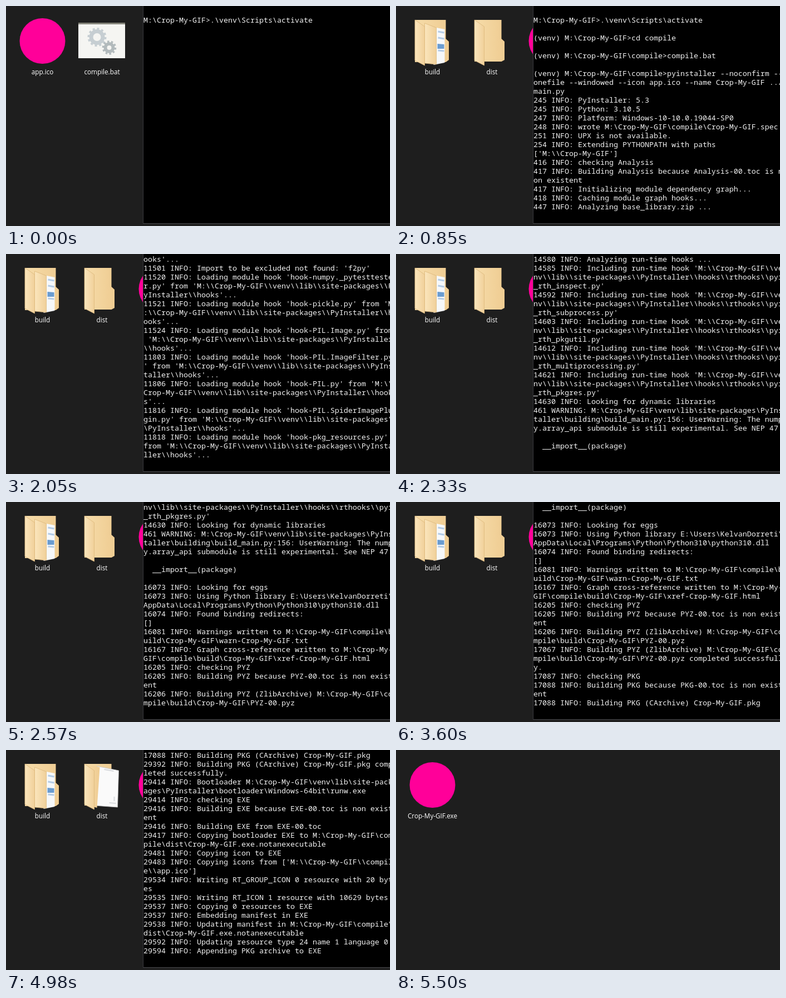
Recreate the animation shown at these times as an HTML page. Size 690 by 396 pixels, loop 5.64 s.

```html
<!DOCTYPE html>
<html lang="en">
<head>
<meta charset="utf-8">
<title>Compile</title>
<style>
html, body { margin: 0; width: 100%; height: 100%; overflow: hidden; background: #1e1e1e; }
#stage { position: relative; width: 690px; height: 396px; overflow: hidden; }
svg { position: absolute; left: 0; top: 0; }
svg text { font: 11.7px "Open Sans", "Noto Sans", sans-serif; fill: #fff; text-anchor: middle; }
#terminal {
  position: absolute; left: 246px; top: 0; width: 444px; height: 391px;
  background: #000; border-left: 1px solid #38383c; border-bottom: 1px solid #48484c;
  overflow: hidden;
}
#screen {
  position: absolute; left: 0; top: 1px; margin: 0; color: #f2f2f2;
  font: 500 13.3333px/16px "Noto Sans Mono", "DejaVu Sans Mono", monospace;
  font-variant-ligatures: none; white-space: pre;
}
#cursor { position: absolute; width: 8px; height: 3px; background: #f2f2f2; }
</style>
</head>
<body>
<div id="stage">
  <svg width="690" height="396" viewBox="0 0 690 396">
    <defs>
      <linearGradient id="tan" x2="1">
        <stop offset="0" stop-color="#f6dca9"/><stop offset="1" stop-color="#efcc92"/>
      </linearGradient>
      <linearGradient id="flap" x2="1">
        <stop offset="0" stop-color="#fbe6bd"/><stop offset="1" stop-color="#f0d09a"/>
      </linearGradient>
      <!-- icons are drawn around x = 0, the centre of a slot -->
      <circle id="app" cy="63" r="41" fill="#ff0099"/>
      <g id="bat">
        <path d="M-42.500 30H41.500V94H-42.500Z" fill="#f5f5f2"/>
        <path d="M-42.500 30H41.500V33H-42.500Z" fill="#85857a"/>
        <g fill="none" stroke="#c6ced2">
          <circle cx="-9" cy="56" r="10.500" stroke-width="7"/>
          <circle cx="-9" cy="56" r="15" stroke-width="4" pathLength="24" stroke-dasharray="1"/>
        </g>
        <g fill="none" stroke="#b2babc">
          <circle cx="13" cy="75" r="7" stroke-width="6"/>
          <circle cx="13" cy="75" r="11" stroke-width="3.500" pathLength="20" stroke-dasharray="1"/>
        </g>
      </g>
      <path id="back" d="M-31.500 25H17V59L22.500 64V97L17 100H-31.500Z" fill="url(#tan)"/>
      <path id="front" d="M-31.500 25L-14 37V107L-31.500 98Z" fill="url(#flap)" stroke="#dcb87c" stroke-width=".8"/>
      <g id="build">
        <path d="M-31.500 25H24V59L29.500 64V97L24 101H-31.500Z" fill="url(#tan)"/>
        <path d="M2 38L22 42V102L2 106Z" fill="#f6f8fa"/>
        <path d="M10 46L21 48M10 57L21 59M10 80L21 81" stroke="#b4cce6" stroke-width="3"/>
        <path d="M9 68L21 69V77L9 77Z" fill="#6a9cd0"/>
        <path d="M-14 31L7 39V105L-14 103Z" fill="url(#flap)" stroke="#dcb87c" stroke-width=".8"/>
        <use href="#front"/>
      </g>
      <g id="full">
        <use href="#back"/>
        <path d="M-9 29L30 37L28 103L-13 100Z" fill="#fafafa" stroke="#c0c0c0" stroke-width=".8"/>
        <path d="M4 35L21 38M13 95L25 96M22 84V92" stroke="#d8dade" stroke-width="2"/>
        <path d="M-31.500 25L-4 31L-9 104L-31.500 98Z" fill="url(#tan)"/>
        <use href="#front"/>
      </g>
      <g id="empty"><use href="#back"/><use href="#front"/></g>
    </defs>
    <rect width="690" height="396" fill="#1e1e1e"/>
    <g id="icons"></g>
  </svg>
  <div id="terminal"><pre id="screen"></pre><div id="cursor"></div></div>
</div>
<script>
const LOOP = 5640, COLS = 56, ROWS = 24;
const SPEED = 9.6, LOG_START = 800;   // the log runs 9.6 times faster than its own clock
const site = String.raw`M:\\Crop-My-GIF\\venv\\lib\\site-packages\\PyInstaller`;
const venvPrompt = String.raw`(venv) M:\Crop-My-GIF\compile>`;

const log = String.raw`245 PyInstaller: 5.3
245 Python: 3.10.5
247 Platform: Windows-10-10.0.19044-SP0
248 wrote M:\Crop-My-GIF\compile\Crop-My-GIF.spec
251 UPX is not available.
254 Extending PYTHONPATH with paths
['M:\\Crop-My-GIF']
416 checking Analysis
417 Building Analysis because Analysis-00.toc is non existent
417 Initializing module dependency graph...
418 Caching module graph hooks...
447 Analyzing base_library.zip ...
3673 Processing pre-find module path hook distutils from '${site}\\hooks\\pre_find_module_path\\hook-distutils.py'.
3674 distutils: retargeting to non-venv dir 'E:\\Users\\KelvanDorreti\\AppData\\Local\\Programs\\Python\\Python310\\lib'
4598 Caching module dependency graph...
4761 running Analysis Analysis-00.toc
4763 Adding Microsoft.Windows.Common-Controls to dependent assemblies of final executable
  required by E:\Users\KelvanDorreti\AppData\Local\Programs\Python\Python310\python.exe
4844 Analyzing M:\Crop-My-GIF\main.py
5832 Processing pre-find module path hook site from '${site}\\hooks\\pre_find_module_path\\hook-site.py'.
5834 site: retargeting to fake-dir '${site}\\fake-modules'
6420 Processing module hooks...
6421 hook distutils
6760 hook distutils.util
7240 hook encodings
7810 hook heapq
8330 hook lib2to3
8850 hook multiprocessing.util
9410 hook numpy
10260 hook platform
10840 hook difflib
11490 hook pytest
11501 Import to be excluded not found: 'f2py'
11520 hook numpy._pytesttester
11521 hook pickle
11524 hook PIL.Image
11803 hook PIL.ImageFilter
11806 hook PIL
11816 hook PIL.SpiderImagePlugin
11818 hook pkg_resources
12680 hook setuptools
13210 hook sysconfig
13740 hook xml.etree.cElementTree
14210 Looking for ctypes DLLs
14580 Analyzing run-time hooks ...
14585 rthook inspect
14592 rthook subprocess
14603 rthook pkgutil
14612 rthook multiprocessing
14621 rthook pkgres
14630 Looking for dynamic libraries
461 WARNING: M:\Crop-My-GIF\venv\lib\site-packages\PyInstaller\building\build_main.py:156: UserWarning: The numpy.array_api submodule is still experimental. See NEP 47.
  __import__(package)

16073 Looking for eggs
16073 Using Python library E:\Users\KelvanDorreti\AppData\Local\Programs\Python\Python310\python310.dll
16074 Found binding redirects:
[]
16081 Warnings written to M:\Crop-My-GIF\compile\build\Crop-My-GIF\warn-Crop-My-GIF.txt
16167 Graph cross-reference written to M:\Crop-My-GIF\compile\build\Crop-My-GIF\xref-Crop-My-GIF.html
16205 checking PYZ
16205 Building PYZ because PYZ-00.toc is non existent
16206 Building PYZ (ZlibArchive) M:\Crop-My-GIF\compile\build\Crop-My-GIF\PYZ-00.pyz
17067 Building PYZ (ZlibArchive) M:\Crop-My-GIF\compile\build\Crop-My-GIF\PYZ-00.pyz completed successfully.
17087 checking PKG
17088 Building PKG because PKG-00.toc is non existent
17088 Building PKG (CArchive) Crop-My-GIF.pkg
29392 Building PKG (CArchive) Crop-My-GIF.pkg completed successfully.
29414 Bootloader M:\Crop-My-GIF\venv\lib\site-packages\PyInstaller\bootloader\Windows-64bit\runw.exe
29414 checking EXE
29416 Building EXE because EXE-00.toc is non existent
29416 Building EXE from EXE-00.toc
29417 Copying bootloader EXE to M:\Crop-My-GIF\compile\dist\Crop-My-GIF.exe.notanexecutable
29481 Copying icon to EXE
29483 Copying icons from ['M:\\Crop-My-GIF\\compile\\app.ico']
29534 Writing RT_GROUP_ICON 0 resource with 20 bytes
29535 Writing RT_ICON 1 resource with 10629 bytes
29537 Copying 0 resources to EXE
29537 Embedding manifest in EXE
29538 Updating manifest in M:\Crop-My-GIF\compile\dist\Crop-My-GIF.exe.notanexecutable
29592 Updating resource type 24 name 1 language 0
29594 Appending PKG archive to EXE
40800 Building EXE from EXE-00.toc completed successfully.`;

const expand = line => line
  .replace(/^(\d+) hook (\S+)$/, (_, n, name) => `${n} Loading module hook 'hook-${name}.py' from '${site}\\\\hooks'...`)
  .replace(/^(\d+) rthook (\S+)$/, (_, n, name) => `${n} Including run-time hook '${site}\\\\hooks\\\\rthooks\\\\pyi_rth_${name}.py'`)
  .replace(/^(\d+) (?!WARNING)/, "$1 INFO: ");

let clock = 0;
const logOutput = log.split("\n").map(line => {
  clock = Math.max(clock, parseInt(line) || 0);
  return { at: LOG_START + clock / SPEED, text: expand(line) + "\n" };
});

const output = [
  { at: 0, text: "\nM:\\Crop-My-GIF>.\\venv\\Scripts\\activate" },
  { at: 60, text: "\n\n(venv) M:\\Crop-My-GIF>", typed: "cd compile" },
  { at: 330, text: "\n\n" + venvPrompt, typed: "compile.bat" },
  { at: 620, text: `\n\n${venvPrompt}pyinstaller --noconfirm --onefile --windowed --icon app.ico --name Crop-My-GIF ../main.py\n` },
  ...logOutput,
  { at: 5070, text: "\n" + venvPrompt }
];

// A full row pushes the cursor on to the next one.
function wrap(line) {
  const rows = [];
  for (let i = 0; i <= line.length; i += COLS) rows.push(line.slice(i, i + COLS));
  return rows;
}

function visibleRows(t) {
  return output.filter(o => o.at <= t)
    .map(o => o.text + (o.typed || "").slice(0, Math.max(0, Math.floor((t - o.at - 30) / 15))))
    .join("").split("\n").flatMap(wrap).slice(-ROWS);
}

const folder = dist => [["build", "build"], [dist, "dist"], ["app", "app.ico"], ["bat", "compile.bat"]];
const views = [
  [0, [["app", "app.ico"], ["bat", "compile.bat"]]],
  [850, folder("empty")],
  [3870, folder("full")],
  [5400, []],
  [5500, [["app", "Crop-My-GIF.exe"]]]
];
const CLOSE = 5250;

const [icons, terminal, screenText, cursor] =
  ["icons", "terminal", "screen", "cursor"].map(id => document.getElementById(id));
let shownView, shownText;

function draw() {
  const t = performance.now() % LOOP;
  const view = views.filter(v => v[0] <= t).pop();
  if (view !== shownView) {
    shownView = view;
    icons.innerHTML = view[1].map(([icon, label], i) =>
      `<g transform="translate(${65.5 + 107 * i})"><use href="#${icon}"/><text y="123">${label}</text></g>`).join("");
  }

  const rows = visibleRows(t);
  const text = rows.join("\n");
  if (text !== shownText) screenText.textContent = shownText = text;
  cursor.style.left = rows[rows.length - 1].length * 8 + "px";
  cursor.style.top = rows.length * 16 - 2 + "px";
  cursor.style.visibility = (t + 19) % 102 < 60 ? "hidden" : "inherit";
  terminal.style.visibility = t < CLOSE ? "visible" : "hidden";
  requestAnimationFrame(draw);
}
draw();
</script>
</body>
</html>
```
